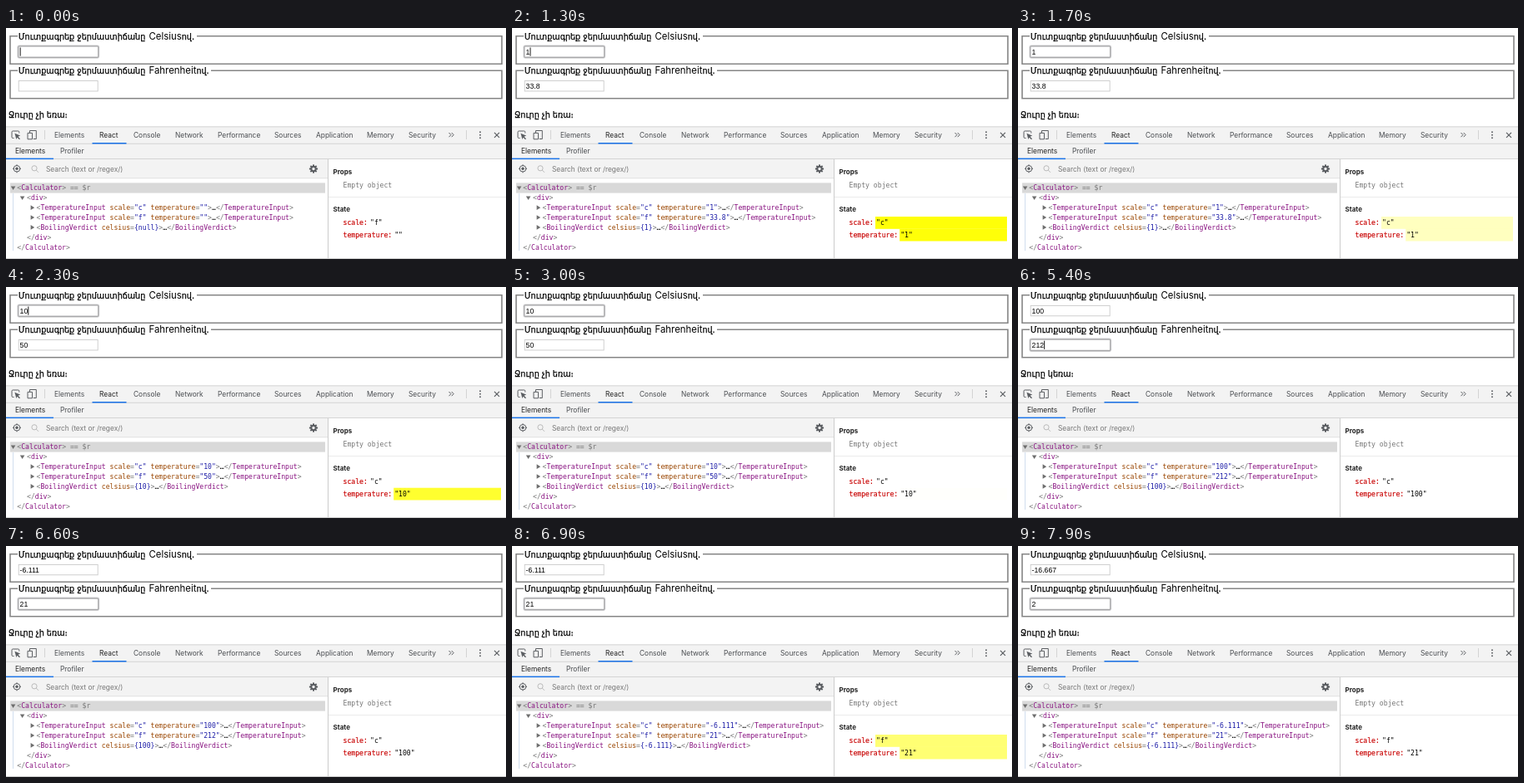
These frames come from a looping animation (600 by 278 pixels, 8 s). An HTML page:

```html
<!DOCTYPE html>
<html lang="hy">
<head>
<meta charset="utf-8">
<title>Temperature calculator</title>
<style>
  html, body { margin: 0; width: 100%; height: 100%; overflow: hidden; background: #fff; }
  svg { display: block; width: 100%; height: 100%; }
  text { white-space: pre; }
  .ui { font: 8.4px Inter, "Liberation Sans", sans-serif; fill: #4a4d51; }
  .bold { font-weight: 700; font-size: 8px; fill: #222; }
  .mono { font: 8.14px "DejaVu Sans Mono", "Liberation Mono", monospace; }
  .arm { font: 9.6px "DejaVu Sans", sans-serif; fill: #000; stroke: #000; stroke-width: .25px; }
  .latin { font: 11.4px Inter, "Liberation Sans", sans-serif; stroke: none; }
  .field { font: 8.7px "Liberation Sans", Arial, sans-serif; fill: #000; }
  .tag { fill: #881280; }
  .attr { fill: #994500; }
  .val { fill: #1a1aa6; }
  .key { fill: #c80000; stroke: #c80000; stroke-width: .15px; }
  .dim { fill: #777; }
  .icon { fill: none; stroke: #5a5d61; stroke-width: 1; }
</style>
</head>
<body>
<svg id="stage" viewBox="0 0 600 278" preserveAspectRatio="none"></svg>
<script>
const LOOP = 8000, STEP = 100, FADE = 1000;
const stage = document.getElementById('stage');

const rect = (x, y, w, h, fill, extra = '') =>
  `<rect x="${x}" y="${y}" width="${w}" height="${h}" fill="${fill}" ${extra}/>`;
const path = (d, extra = 'class="icon"') => `<path d="${d}" ${extra}/>`;
const text = (x, y, cls, body, id = '') =>
  `<text x="${x}" y="${y}" class="${cls}" ${id && `id="${id}"`}>${body}</text>`;
const group = (id) => `<g id="${id}"></g>`;
const esc = s => s.replace(/</g, '&lt;').replace(/>/g, '&gt;');
const span = (cls, s) => `<tspan class="${cls}">${esc(s)}</tspan>`;
const rowY = i => 195.4 + i * 11.87;

// Page: two fieldsets with legends
function fieldset(top, unit, gapEnd) {
  return path(`M14 ${top}H5V${top + 33.6}H595V${top}H${gapEnd}`,
      'fill="none" stroke="#858585" stroke-width="1.6"') +
    text(15, top + 3.8, 'arm', 'Մուտքագրեք ջերմաստիճանը') +
    text(171.5, top + 3.8, 'arm', span('latin', unit) + 'ով.');
}

// Inspector: tab strips, search bar and pane borders
function chrome() {
  const tabs = [['Elements', 58], ['React', 112], ['Console', 153], ['Network', 203],
    ['Performance', 254], ['Sources', 322], ['Application', 372], ['Memory', 433], ['Security', 483]];
  const teeth = Array.from({ length: 8 }, (_, i) =>
    rect(368, 164.4, 2, 2.4, '#5a5d61', `transform="rotate(${i * 45} 369 169.5)"`)).join('');
  return rect(0, 118.5, 600, 39, '#f3f3f3') +
    rect(0, 157.5, 386, 23, '#f3f3f3') +
    rect(0, 118.5, 600, .8, '#cbcbcb') +
    rect(0, 138.8, 600, .8, '#cccccc') +
    rect(0, 157.2, 600, .8, '#cccccc') +
    rect(0, 180.5, 386, .7, '#d4d4d4') +
    rect(386, 158, 1, 120, '#cccccc') +
    rect(387, 203, 213, .7, '#e4e4e4') +
    rect(0, 277, 600, 1, '#cccccc') +
    tabs.map(([name, x]) => text(x, 131.8, 'ui', name === 'React' ? `<tspan fill="#222">${name}</tspan>` : name)).join('') +
    rect(103.5, 138, 41, 1.5, '#1a73e8') +
    rect(46, 123, .8, 11, '#cccccc') +
    rect(552, 123, .8, 11, '#cccccc') +
    path('M9.5 132.5H8.2Q7 132.5 7 131.3V125.2Q7 124 8.2 124H14.6Q15.8 124 15.8 125.2V126.5') +
    path('M10.5 126.8L17.2 129.6L14.5 130.7L17 133.2L16 134.2L13.5 131.7L12.3 134Z', 'fill="#5a5d61"') +
    path('M28.5 126V123.5H36.3V133.5H32.8M26 126.4H31.5V133.8H26Z') +
    path('M531.5 126L534 128.6L531.5 131.2M534.7 126L537.2 128.6L534.7 131.2') +
    [125.2, 128.7, 132.2].map(y => `<circle cx="569" cy="${y}" r=".95" fill="#5a5d61"/>`).join('') +
    path('M586 125.8L592 131.8M592 125.8L586 131.8', 'class="icon" style="stroke-width:1.2"') +
    text(11, 151, 'ui', '<tspan fill="#222">Elements</tspan>') +
    text(65, 151, 'ui', 'Profiler') +
    rect(0, 156.6, 57, 1.5, '#1a73e8') +
    '<circle cx="13" cy="169.3" r="3.8" class="icon"/><circle cx="13" cy="169.3" r="1.7" fill="#5a5d61"/>' +
    path('M13 164.3V166M13 172.6V174.3M8 169.3H9.7M16.3 169.3H18') +
    '<circle cx="34" cy="168.8" r="3.1" fill="none" stroke="#bbb"/>' +
    path('M36.3 171.1L39 173.8', 'stroke="#bbb"') +
    text(48, 172.6, 'ui dim', 'Search (text or /regex/)') +
    teeth + '<circle cx="369" cy="169.5" r="2.7" fill="none" stroke="#5a5d61" stroke-width="2"/>';
}

function arrow(x, y, open) {
  const d = open ? `M${x - 2.8} ${y - 2}h5.6l-2.8 4.6z` : `M${x - 2.2} ${y - 2.8}v5.6l4.6 -2.8z`;
  return path(d, 'fill="#6e6e6e"');
}

const tag = (name, open = '<') => span('dim', open) + span('tag', name);
const END = span('dim', '>');

function treeFrame() {
  return rect(5, 186.4, 378, 12.2, '#d9d9d9') +
    rect(8, 199, .8, 69, '#c5d6ea') +
    arrow(8.6, 192.5, true) + arrow(19.6, 204.4, true) +
    [2, 3, 4].map(i => arrow(31.8, rowY(i) - 3, false)).join('') +
    text(13.3, rowY(0), 'mono', tag('Calculator') + END + span('dim', ' == $r')) +
    text(25, rowY(1), 'mono', tag('div') + END) +
    text(25, rowY(5), 'mono', tag('div', '</') + END) +
    text(13.3, rowY(6), 'mono', tag('Calculator', '</') + END);
}

stage.innerHTML =
  fieldset(9.7, 'Celsius', 229) + fieldset(51.2, 'Fahrenheit', 246) +
  group('fields') + text(3, 108.2, 'arm', '', 'verdict') +
  chrome() + treeFrame() + group('tree') +
  text(392.5, 175.8, 'ui bold', 'Props') + text(404.5, 191.8, 'mono dim', 'Empty object') +
  text(392.5, 220.8, 'ui bold', 'State') + group('state');

const $ = id => document.getElementById(id);
const put = (id, html) => { if ($(id).innerHTML !== html) $(id).innerHTML = html; };

// Edits: when typed, when the inspector reacts, and the resulting state
const edits = [
  { at: 0, seen: -FADE, scale: 'f', value: '' },
  { at: 1200, seen: 1250, scale: 'c', value: '1' },
  { at: 2100, seen: 2150, scale: 'c', value: '10' },
  { at: 3200, seen: 3170, scale: 'c', value: '100' },
  { at: 6600, seen: 6630, scale: 'f', value: '21' },
  { at: 7900, seen: 8000, scale: 'f', value: '2' }
];
const FOCUS_F = 4700, DESELECT = 5400, CARET_END = 6600;

const round = n => String(Math.round(n * 1000) / 1000);
function temps({ scale, value }) {
  if (value === '') return { c: '', f: '' };
  return scale === 'c'
    ? { c: value, f: round(value * 9 / 5 + 32) }
    : { c: round((value - 32) * 5 / 9), f: value };
}

// The CSS "ease" curve, solved by bisection
function ease(x) {
  if (x <= 0) return 0;
  if (x >= 1) return 1;
  const bez = (a, b, u) => 3 * a * u * (1 - u) ** 2 + 3 * b * u * u * (1 - u) + u ** 3;
  let lo = 0, hi = 1;
  for (let i = 0; i < 20; i++) {
    const mid = (lo + hi) / 2;
    if (bez(.25, .25, mid) < x) lo = mid; else hi = mid;
  }
  return bez(.1, 1, lo);
}

function caretOn(t) {
  if (t >= CARET_END || (t >= FOCUS_F && t < DESELECT)) return false;
  const since = [0, 1200, 2100, 3200, DESELECT].filter(k => k <= t).pop();
  return (t - since) % 1000 < 500;
}

function input(y, value, focused, selected, caret) {
  const box = focused
    ? rect(13.4, y - 1.6, 98.8, 16.4, '#d2d2d4', 'rx="2.8"') +
      rect(14.2, y - .8, 97.2, 14.8, '#a8a8aa', 'rx="2"') + rect(15.5, y + .6, 94.6, 12, '#fff')
    : rect(15.2, y + .4, 95, 12.4, '#fff', 'stroke="#c9c9c9" stroke-width=".9"');
  const end = 16.6 + value.length * 4.84;
  return box +
    (selected ? rect(16.4, y + 1.2, end - 16.4, 11, '#b3d7ff') : '') +
    text(16.6, y + 9.7, 'field', value) +
    (caret ? rect(end + .1, y + 1.5, .9, 10.2, '#000') : '');
}

function treeRow(i, name, attrs) {
  const body = attrs.map(([key, open, val, close]) =>
    ' ' + span('attr', key) + span('dim', '=') + span('val', open + val + close)).join('');
  return text(36.5, rowY(i), 'mono', tag(name) + body + END + '…' + tag(name, '</') + END);
}

const quoted = (key, val) => [key, '"', val, '"'];

function stateRow(y, x, key, val, glow) {
  return (glow ? rect(x - 1, y - 10, 595 - x, 14.8, '#ffff00', `fill-opacity="${glow.toFixed(3)}"`) : '') +
    text(404.5, y, 'mono', span('key', key + ':')) + text(x, y, 'mono', `"${val}"`);
}

function draw(t) {
  const typed = edits.filter(e => e.at <= t).pop();
  const shown = edits.filter(e => e.seen <= t).pop();
  const before = edits[edits.indexOf(shown) - 1];
  const page = temps(typed), tree = temps(shown);
  const onF = t >= FOCUS_F, caret = caretOn(t);

  put('fields',
    input(22, page.c, !onF, false, !onF && caret) +
    input(63.2, page.f, onF, onF && t < DESELECT, onF && caret));
  put('verdict', +page.c >= 100 ? 'Ջուրը կեռա։' : 'Ջուրը չի եռա։');

  put('tree',
    ['c', 'f'].map((s, i) => treeRow(2 + i, 'TemperatureInput',
      [quoted('scale', s), quoted('temperature', tree[s])])).join('') +
    treeRow(4, 'BoilingVerdict', [['celsius', '{', tree.c || 'null', '}']]));

  const glow = 1 - ease((t - shown.seen) / FADE);
  const scaleGlow = before && before.scale !== shown.scale ? glow : 0;
  put('state',
    stateRow(237, 437, 'scale', shown.scale, scaleGlow) +
    stateRow(251.7, 466.2, 'temperature', shown.value, glow));
}

const start = performance.now();
function tick() {
  const t = (performance.now() - start) % LOOP;
  draw(Math.floor(t / STEP) * STEP);
  requestAnimationFrame(tick);
}
tick();
</script>
</body>
</html>
```
